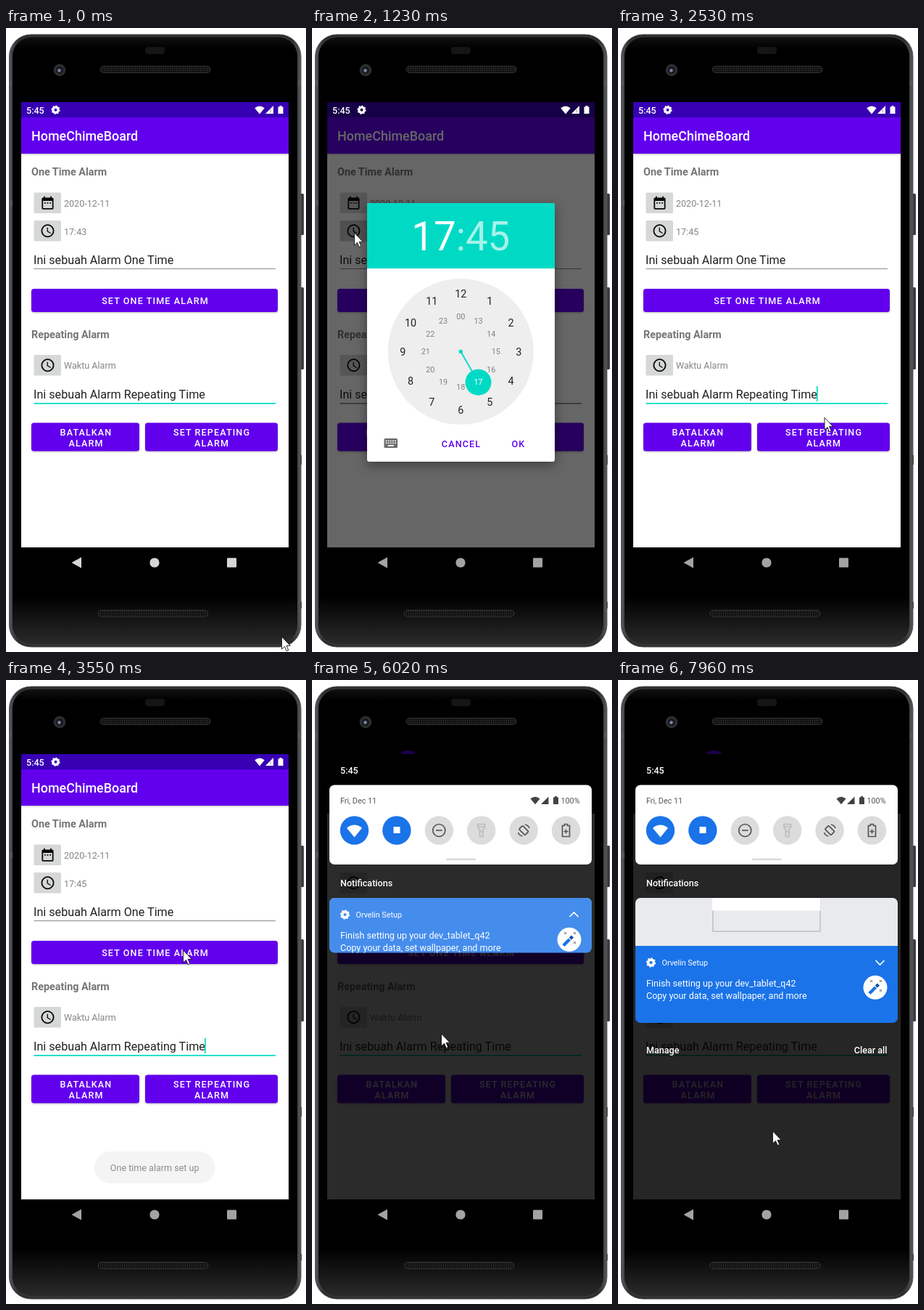
An HTML page for the animation above (8 s loop, 414 by 859 pixels).

```html
<!DOCTYPE html>
<html lang="id">
<head>
<meta charset="utf-8">
<title>Alarm demo</title>
<style>
  html, body { margin: 0; width: 100%; height: 100%; overflow: hidden; background: #fff; }
  svg { display: block; width: 414px; height: 859px; font-family: Roboto, sans-serif; }
  .med { font-weight: 500; }
  .bold { font-weight: 700; fill: #757575; }
  .btn { font-weight: 500; font-size: 12.57px; letter-spacing: 1.12px; text-anchor: middle; }
  .mid { text-anchor: middle; }
  .lift { filter: drop-shadow(0 1px 1px rgba(0,0,0,.28)); }
  .line { fill: none; stroke: #555; stroke-width: 1.7; }
</style>
</head>
<body>
<svg id="stage" viewBox="0 0 414 859"></svg>
<script>
const PURPLE = '#6200ee', TEAL = '#00dac5', BLUE = '#1a73e8';
const stage = document.getElementById('stage');

const rect = (x, y, w, h, fill, r = 0, more = '') =>
  `<rect x="${x}" y="${y}" width="${w}" height="${h}" rx="${r}" fill="${fill}" ${more}/>`;
const circle = (x, y, r, fill, more = '') =>
  `<circle cx="${x}" cy="${y}" r="${r}" fill="${fill}" ${more}/>`;
const path = (d, fill, more = '') => `<path d="${d}" fill="${fill}" ${more}/>`;
const text = (x, y, s, size, fill, more = '') =>
  `<text x="${x}" y="${y}" font-size="${size}" fill="${fill}" ${more}>${s}</text>`;
const group = (id, body, more = '') => `<g id="${id}" ${more}>${body}</g>`;
const label = (x, y, s, fill = '#fff') => text(x, y, s, 12.57, fill, 'class="btn"');

const gear = (x, y, r) =>
  circle(x, y, r * .6, 'none', `stroke="#fff" stroke-width="${r * .55}"`) +
  circle(x, y, r * .87, 'none', `stroke="#fff" stroke-width="${r * .3}" pathLength="16" stroke-dasharray="1"`);
const wifi = (x, y, w, fill) =>
  path(`M${x} ${y + w * .4}L${x - w / 2} ${y - w * .2}Q${x} ${y - w * .6} ${x + w / 2} ${y - w * .2}Z`, fill);
const signal = (x, y, s, fill) => path(`M${x} ${y}l${s} ${-s}v${s}z`, fill) +
  path(`M${x + s * .64} ${y - s * .12}v${-s * .42}`, 'none', 'stroke="#000" stroke-opacity=".4"');
const battery = (x, y, fill) => path(`M${x} ${y + 1.5}h2v-1.5h3v1.5h2v9.5h-7z`, fill);

const phone = `
  <linearGradient id="rim" x2="1"><stop stop-color="#55585a"/><stop offset=".03" stop-color="#2a2c2d"/>
    <stop offset=".97" stop-color="#2a2c2d"/><stop offset="1" stop-color="#55585a"/></linearGradient>
  <linearGradient id="face" x2="0" y2="1"><stop stop-color="#111"/><stop offset=".02" stop-color="#000"/>
    <stop offset=".92" stop-color="#000"/><stop offset="1" stop-color="#2b2b2b"/></linearGradient>
  <pattern id="mesh" width="3" height="3" patternUnits="userSpaceOnUse">${rect(0, 0, 3, 3, '#0c0c0c')}${circle(1.5, 1.5, .9, '#333')}</pattern>` +
  rect(405, 228, 6, 57, '#3a3c3d', 1.5) + rect(405, 357, 6, 113, '#3a3c3d', 1.5) +
  rect(405, 588, 3, 13, '#222') + rect(405, 790, 3, 9, '#222') +
  rect(4.5, 9, 402.5, 843, 'url(#rim)', 30, 'stroke="#4c4f51"') +
  rect(8.5, 12, 394, 837, 'url(#face)', 27, 'stroke="#45484a" stroke-width=".8"') +
  rect(4, 237, 5, 8, '#55585a') + rect(4, 72, 4, 8, '#55585a') + rect(403, 72, 4, 8, '#55585a') +
  rect(192, 26, 27, 10, '#151515', 4) +
  circle(74, 58, 8.3, '#2e2f32') + circle(74, 58, 5.2, '#191a22') + circle(73.5, 58.5, 2.2, '#7f88a6') +
  rect(130, 52.5, 152, 9, 'url(#mesh)', 4.5, 'stroke="#333"') +
  rect(127, 801.5, 152, 9, 'url(#mesh)', 4.5, 'stroke="#333"');

const clockIcon = 'M12 2a10 10 0 1 0 .01 0zM12 4a8 8 0 1 1-.01 0zM12.5 7H11v6l5.25 3.15.75-1.23-4.5-2.67z';
const dateIcon = 'M9 11H7v2h2zm4 0h-2v2h2zm4 0h-2v2h2zm2-7h-1V2h-2v2H8V2H6v2H5a2 2 0 0 0-2 2v14a2 2 0 0 0 2 2h14a2 2 0 0 0 2-2V6a2 2 0 0 0-2-2zm0 16H5V9h14z';
const iconButton = (y, d, id) => rect(38.5, y, 37.5, 28.5, '#d6d7d7', 1.5, `id="${id}"`) +
  path(d, '#0a0a0a', `fill-rule="evenodd" transform="translate(46.7 ${y + 3.5}) scale(.898)"`);
const button = (x, y, w, h, id = '') => rect(x, y, w, h, PURPLE, 3.5, `class="lift" id="${id}"`);

const app =
  rect(21, 102, 369, 613, '#fff') + rect(21, 102, 369, 21, '#3700b3') + rect(21, 123, 369, 50, PURPLE, 0, 'class="lift"') +
  text(35, 155, 'HomeChimeBoard', 17.96, '#fff', 'class="med"') +
  text(35, 203, 'One Time Alarm', 14.37, '#757575', 'class="bold"') +
  iconButton(226.5, dateIcon, 'dateBtn') + text(80, 245.7, '2020-12-11', 12.57, '#858585') +
  iconButton(265, clockIcon, 'clockBtn') + text(80, 284.5, '17:43', 12.57, '#858585', 'id="chosen"') +
  text(38, 325.2, 'Ini sebuah Alarm One Time', 16.16, '#212121') + rect(38.5, 331, 333.5, 1, '#8c8c8c') +
  button(35, 359, 340, 32, 'setBtn') + label(206, 380, 'SET ONE TIME ALARM') +
  text(35, 426.5, 'Repeating Alarm', 14.37, '#757575', 'class="bold"') +
  iconButton(450, clockIcon, 'repeatBtn') + text(80, 469, 'Waktu Alarm', 12.57, '#858585') +
  text(38, 509.5, 'Ini sebuah Alarm Repeating Time', 16.16, '#212121') +
  rect(38.5, 516, 333.5, 1.7, TEAL, 0, 'id="focus"') + rect(274, 493, 1.7, 21, TEAL, 0, 'id="caret"') +
  button(35, 543.5, 149, 39) + label(110.5, 560.5, 'BATALKAN') + label(110.5, 575.5, 'ALARM') +
  button(192, 543.5, 183, 39) + label(284, 560.5, 'SET REPEATING') + label(284, 575.5, 'ALARM') +
  group('toast', rect(122, 649, 166.5, 44, '#eee', 21.5) + text(205.2, 676, 'One time alarm set up', 12.57, '#444', 'class="mid"'));

const status = text(28, 117.5, '5:45', 12.57, '#fff', 'class="med"') + gear(68.5, 112.7, 6) +
  wifi(350, 113, 13.5, '#fff') + signal(358, 118, 11, '#fff') + battery(375.5, 107, '#fff');

// Clock face: 1-12 outside, 13-00 inside
let digits = '';
for (let h = 1; h <= 24; h++) {
  const inner = h > 12, r = inner ? 48.5 : 80, a = h * Math.PI / 6;
  const size = inner ? 10.8 : 14.37, fill = h == 17 ? '#fff' : inner ? '#808080' : '#222';
  digits += text(205.3 + r * Math.sin(a), 445.5 - r * Math.cos(a) + size * .36, h == 24 ? '00' : h, size, fill, 'class="mid"');
}
let keys = '';
for (let i = 0; i < 10; i++) keys += rect(101.7 + i % 5 * 3.1, 567.5 + (i / 5 | 0) * 3, 1.7, 1.7, '#fff');

const dialog =
  rect(76, 241, 259, 356, '#fff', 3, 'style="filter:drop-shadow(0 5px 8px rgba(0,0,0,.4))"') +
  path('M76 331V244a3 3 0 0 1 3-3H332a3 3 0 0 1 3 3V331z', TEAL) +
  text(205.3, 305.5, '17<tspan fill-opacity=".65">:45</tspan>', 54.6, '#fff', 'class="mid"') +
  circle(205.3, 445.5, 100.5, '#eee') + circle(205.3, 445.5, 2.7, TEAL) +
  path('M205.3 445.5L229.5 487.5', 'none', `stroke="${TEAL}" stroke-width="1.8"`) + circle(229.5, 487.7, 18, TEAL) + digits +
  rect(99.5, 565, 18.5, 13, '#6b6b6b', 1.6) + keys + rect(104.5, 574, 8.5, 1.7, '#fff') +
  rect(253, 556, 62, 32, PURPLE, 3, 'id="okPress" opacity=".15"') +
  label(206, 576.5, 'CANCEL', PURPLE) + label(285, 576.5, 'OK', PURPLE);

const tiles = [0, 1, 2, 3, 4, 5].map(i => circle(58.5 + i * 58.4, 207, 19.7, i < 2 ? BLUE : '#dcdcdc')).join('');
const panel =
  text(39, 128.5, '5:45', 12.57, '#fff', 'class="med"') + rect(24, 144.5, 362, 109.5, '#fff', 7) +
  text(39, 169.8, 'Fri, Dec 11', 10.78, '#555') + wifi(308, 166, 13, '#444') + signal(316, 171, 10.5, '#444') +
  battery(333, 160, '#444') + text(343.5, 169.8, '100%', 10.78, '#555') + tiles +
  wifi(58.5, 208, 21, '#fff') + rect(112.5, 202, 9, 9, '#fff') +
  circle(175.3, 207, 8.5, 'none', 'class="line"') + path('M171 207h8.6', 'none', 'class="line"') +
  path('M229 198.5h9.5v4l-2.5 3.5v9.5h-4.5v-9.5l-2.5-3.5zM229 202h9.5M233.7 207v3', 'none', 'class="line" style="stroke:#bdbdbd"') +
  rect(288.7, 201.2, 7, 11.6, 'none', 1, 'class="line" transform="rotate(-45 292.2 207)"') +
  path('M294 199a8 8 0 0 1 6 5M290.5 215a8 8 0 0 1-6-5', 'none', 'class="line"') +
  path('M345.5 200.5h3v-2h4v2h3v15h-10zM350.5 205.5v6M347.5 208.5h6', 'none', 'class="line"') +
  rect(185, 245.8, 41, 2.4, '#dadada', 1);

const setup =
  rect(24, 300, 362, 106, BLUE) + rect(24, 300, 362, 106, '#fff', 0, 'id="tint"') +
  gear(45.5, 323, 6.5) + text(60.5, 327, 'Orvelin Setup', 10.78, '#fff') +
  path('M355.5 320l6 6 6-6', 'none', 'id="chevron" stroke="#fff" stroke-width="1.7"') +
  text(39, 355.5, 'Finish setting up your dev_tablet_q42', 12.57, '#fff') +
  text(39, 373, 'Copy your data, set wallpaper, and more', 12.57, '#fff') +
  circle(355, 357.3, 16.5, '#fff') + path('M347 365.5l8.5-8.5', 'none', `stroke="${BLUE}" stroke-width="4.5"`) +
  path('M356.3 356.2l3.2-3.2', 'none', 'stroke="#174ea6" stroke-width="4.5"') +
  path('M348 347l3 3m0-3l-3 3M361 347l3 3m0-3l-3 3M361 360l3 3m0-3l-3 3', 'none', 'stroke="#555"');

const shade =
  rect(21, 102, 369, 613, '#000', 0, 'id="scrim"') + rect(21, 102, 369, 82, '#000', 0, 'id="top"') +
  group('panel', panel) +
  group('list', text(39, 283.5, 'Notifications', 12.57, '#fff', 'class="med"') +
    group('cards', rect(24, 300, 362, 66, '#e8eaed') +
      rect(131, 290, 148, 56, '#e8eaed', 0, 'stroke="#c4c6c9" stroke-width="1.8"') + rect(130, 300, 149.5, 17.5, '#fff') +
      group('setup', setup), 'clip-path="url(#cardClip)"') +
    group('footer', text(39, 447.5, 'Manage', 12.57, '#fff', 'class="med"') +
      text(371.5, 447.5, 'Clear all', 12.57, '#fff', 'class="med" text-anchor="end"')));

stage.innerHTML = `<clipPath id="screen">${rect(21, 102, 369, 613, '#000')}</clipPath>
  <clipPath id="cardClip">${rect(24, 300, 362, 106, '#000', 7, 'id="cardBox"')}</clipPath>` +
  phone + group('app', app) + rect(21, 102, 369, 613, '#000', 0, 'id="dim"') + group('status', status) +
  group('dialog', dialog) +
  path('M122 102a10.5 5 0 0 1 21 0z', '#1c0046', 'id="arc"') +
  group('shade', shade, 'clip-path="url(#screen)"') +
  group('nav', path('M90.5 736l13.5-7.5v15z') + circle(205, 736, 6.6) + rect(305, 729.5, 13, 13, '', 1)) +
  path('M.5 0V17l4-3.6 2.7 6.2 2.6-1.1L7.1 12.3h5.2z', '#fff', 'id="mouse" stroke="#111" stroke-width=".9"');

const el = {};
stage.querySelectorAll('[id]').forEach(e => el[e.id] = e);
// The navigation glyphs share their group's colour
el.nav.querySelectorAll('*').forEach(e => e.removeAttribute('fill'));

const ramp = (t, a, b) => Math.max(0, Math.min(1, (t - a) / (b - a)));
const ease = p => p * p * (3 - 2 * p);
const set = (id, name, value) => el[id].setAttribute(name, value);
const alpha = (id, v) => set(id, 'opacity', v);
const shift = (id, x, y) => set(id, 'transform', `translate(${x} ${y})`);

// Pointer stops: time, x, y
const stops = [[0, 380, 838], [850, 58, 282], [1310, 58, 282], [2150, 295, 579], [2240, 295, 579], [3020, 244, 372],
  [4030, 244, 372], [4490, 60, 378], [4570, 60, 378], [4870, 66, 193], [5180, 92, 113], [5410, 132, 111],
  [5480, 132, 111], [6030, 178, 487], [6330, 213, 621], [8000, 213, 621]];

function pointer(t) {
  const i = Math.max(1, stops.findIndex(s => s[0] >= t));
  const [a, x, y] = stops[i - 1], [b, u, v] = stops[i], p = ease(ramp(t, a, b));
  shift('mouse', x + (u - x) * p, y + (v - y) * p);
}

function draw(t) {
  pointer(t);
  const away = t > 1100 && t < 2200;
  set('focus', 'fill', away ? '#8c8c8c' : TEAL);
  alpha('caret', !away && t < 5480 && (t + 800) % 1000 < 500 ? 1 : 0);
  el.chosen.textContent = t < 2140 ? '17:43' : '17:45';
  set('nav', 'fill', t < 1140 ? '#d6d6d6' : '#a3a3a3');

  set('clockBtn', 'fill', t > 840 && t < 2140 ? '#c9caca' : '#d6d7d7');
  set('setBtn', 'fill', t > 3070 && t < 3400 ? '#7b2cf1' : PURPLE);
  alpha('okPress', t > 2070 && t < 2200 ? .15 : 0);
  alpha('dim', .6 * ramp(t, 1080, 1225) * (1 - ramp(t, 2150, 2390)));
  alpha('dialog', ramp(t, 1080, 1225) * (1 - ramp(t, 2155, 2290)));
  alpha('toast', ramp(t, 3450, 3615) * (1 - ramp(t, 5220, 5410)));

  const open = ramp(t, 5440, 5960), grow = ramp(t, 6030, 6250), added = 66 * ease(ramp(t, 7500, 7955));
  alpha('status', 1 - ramp(t, 5440, 5640));
  alpha('scrim', .83 * ramp(t, 5440, 6020) + .02 * grow);
  alpha('top', open);
  alpha('arc', t > 5480 ? 1 : 0);
  shift('panel', 0, -155 * (1 - ease(open)));
  alpha('panel', ramp(t, 5440, 5560));
  alpha('list', ramp(t, 5640, 5960));
  shift('list', 0, -60 * (1 - ease(open)));
  set('cardBox', 'height', 75.5 * ramp(t, 5560, 6015) + 30.5 * grow + added);
  shift('setup', 0, added);
  shift('footer', 0, added);
  alpha('footer', ramp(t, 6090, 6250));
  alpha('tint', .19 * (1 - grow));
  set('chevron', 'transform', `rotate(${180 * (1 - grow)} 361.5 323)`);
}

const STEP = 77.35;
function tick() {
  const t = performance.now() % 8000;
  draw(Math.max(0, 70 + STEP * Math.floor((t - 60) / STEP)));
  requestAnimationFrame(tick);
}
tick();
</script>
</body>
</html>
```
